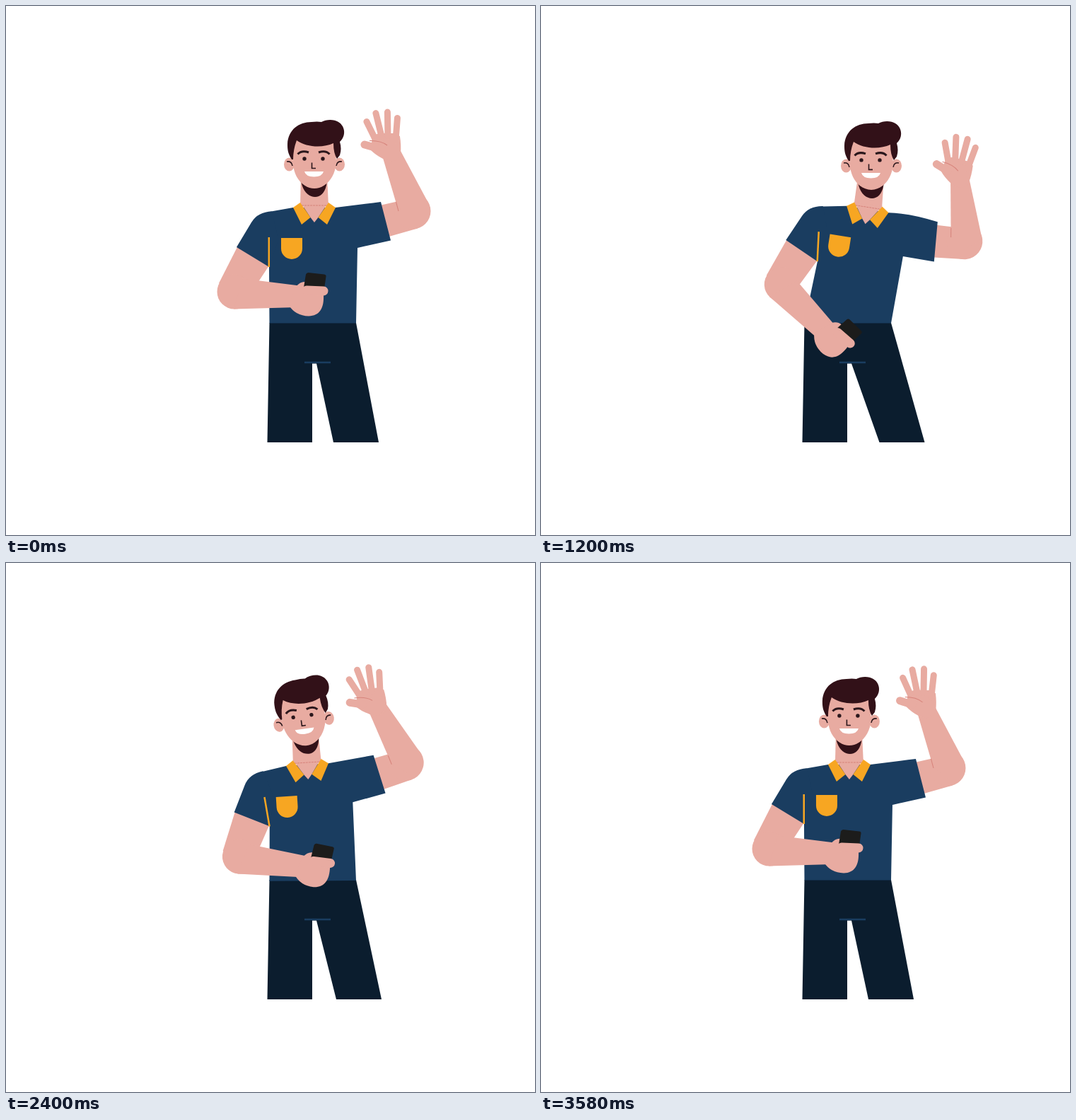
Recreate the animation shown at these times as an HTML page. Size 748x748 px, loop 3.6 s.

```html
<!DOCTYPE html>
<html lang="en">
<head>
<meta charset="utf-8">
<title>Waving man</title>
<style>
  html, body { margin: 0; width: 100%; height: 100%; overflow: hidden; background: #fff; }
  svg { display: block; width: 100%; height: 100%; }
  .skin { fill: #e8aba1; }
  .limb { fill: none; stroke: #e8aba1; stroke-linecap: round; }
  .shirt { fill: #1a3d60; }
  .navy { fill: #0b1d2e; }
  .gold { fill: #f7a622; }
  .hair { fill: #321118; }
  .ink { fill: none; stroke: #2b171c; stroke-width: 1.6; }
  .brow { fill: none; stroke: #2b171c; stroke-width: 3; }
  .crease { fill: none; stroke: #d6837b; stroke-width: 1; }
</style>
</head>
<body>
<svg viewBox="0 0 748 748">
  <g id="waveUpper"><path class="skin" d="M524 283L555 276L575 290L582 314.500L538 327Z"/></g>
  <g id="waveFore">
    <circle class="skin" cx="575" cy="290" r="25.500"/>
    <path class="skin" d="M533 215L555 290L575 305L598 280L558 205Z"/>
    <path class="crease" d="M551.500 277L555 290"/>
  </g>
  <g id="waveHand">
    <circle class="skin" cx="546" cy="207" r="12"/>
    <path class="skin" d="M518 184L527 180H549L557 184Q559 197 558 208L546 220L533 216Q523 211 516 204Z"/>
    <path class="limb" stroke-width="9" d="M510 163.500L522 188M523 151.500L531 184M539.500 150L540 184M553.500 158.500L551 190"/>
    <path class="limb" stroke-width="11" d="M507 196L525 201"/>
    <path class="crease" d="M514 190.500Q530 190 539 197"/>
  </g>

  <path id="legs" class="navy"/>
  <path d="M422 504H459" stroke="#1a3d60" stroke-width="2.500"/>
  <path id="shirt" class="shirt"/>
  <path id="neck" class="skin"/>

  <g id="chest">
    <path class="skin" d="M416 277L430.500 299L436 306L441.500 299L456 277Z"/>
    <path class="crease" stroke-dasharray="3 1" d="M418 282H453"/>
    <path id="collar" class="gold" d="M406 285L416 278L430.500 299L418 309Z"/>
    <use href="#collar" transform="translate(872 0) scale(-1 1)"/>
    <path class="gold" d="M389 328H419V343A15 15 0 0 1 389 343Z"/>
  </g>

  <g id="head">
    <path class="hair" d="M417 246C419 262 428 270 437 270S453 262 454 246Z"/>
    <g id="side">
      <ellipse class="skin" cx="400.500" cy="224" rx="7.500" ry="9.500"/>
      <path class="ink" d="M397 220Q404 219 405 226"/>
    </g>
    <use href="#side" transform="translate(872 0) scale(-1 1)"/>
    <path class="skin" d="M405 190L406.500 228C409 244 421 258 436 258S463 244 466 228L468 190Z"/>
    <path class="hair" d="M404 217C398 208 398 201 398 195C399 175 414 164 432 164Q440 163 446 164C453 160 464 160 470 164C480 170 481 184 472 192Q475 202 472 211L468 216Q463 208 463 194C448 201 425 200 411 190Q406 203 406 217Z"/>
    <g id="eye">
      <path class="brow" d="M412.500 209.500Q418 203.500 428 207"/>
      <circle cx="422" cy="216" r="2.700" fill="#2b171c"/>
    </g>
    <use href="#eye" transform="translate(870 0) scale(-1 1)"/>
    <path class="ink" d="M432.500 221.500V229.500H438"/>
    <path fill="#fff" d="M422 234H449Q447 241.500 435.500 241.500T422 234Z"/>
  </g>

  <g id="phoneUpper"><path class="skin" d="M330 335L301 392L323 412L345 408L372 367Z"/></g>
  <g id="phoneFore">
    <circle class="skin" cx="323" cy="404" r="24.500"/>
    <path class="skin" d="M335 385.500L415 395.500L412 426L322 428.500Z"/>
    <g id="phoneHand">
      <path class="skin" d="M400 423Q409 438 428 438.500C443 438 450 428 449 408L424 398V390Q416 389 410 397Z"/>
      <path fill="#1c1c1b" d="M427.500 377L450 379.500Q453 380 452.500 382.500L450 400L421 398L424 379.500Q425 377 427.500 377Z"/>
      <path class="limb" stroke-width="13" d="M425 402L449 403"/>
    </g>
  </g>
  <g id="sleeve">
    <path class="shirt" d="M376 290.500Q356 291 347 306L326 341L372 369L385 330Z"/>
    <path d="M371.800 327V369" stroke="#f7a622" stroke-width="2.500"/>
  </g>
</svg>
<script>
const LOOP = 3600, BEAT = 1200;
const el = {};
document.querySelectorAll('[id]').forEach(n => el[n.id] = n);

const hip = [433, 450], shoulder = [478, 318], elbow = [575, 291], wrist = [545, 212];
const shoulder2 = [373, 318], elbow2 = [323, 404], wrist2 = [405, 410], face = [435, 216];

function ease(t, from, to) {
  const x = Math.min(1, Math.max(0, (t - from) / (to - from)));
  return x * x * (3 - 2 * x);
}

// Rest pose, lean right, cross over to the left, then back to rest.
function sway(t, right, left, settle = 580, from = 1700, to = 2760) {
  const cross = ease(t, from, to);
  return right * (ease(t, 0, settle) - cross) + left * (cross - ease(t, 3000, LOOP));
}

// where p lands when its joint moves from rest to now and turns by deg
function turn(p, rest, now, deg) {
  const a = deg * Math.PI / 180, x = p[0] - rest[0], y = p[1] - rest[1];
  return [now[0] + x * Math.cos(a) - y * Math.sin(a), now[1] + x * Math.sin(a) + y * Math.cos(a)];
}

function place(node, rest, now, deg) {
  node.setAttribute('transform',
    `translate(${now[0] - rest[0]} ${now[1] - rest[1]}) rotate(${deg} ${rest})`);
}

function draw(time) {
  const t = time % LOOP;

  // body
  const lean = sway(t, 9, -8), headX = sway(t, 31, -33);
  const tilt = sway(t, 0, -8, 580, 1700, 2400);
  const step = sway(t, 15.5, 0, 600, 1800, 2700);

  // waving arm: one swing per beat on top of the sway, the hand trails behind
  const arm = (right, left) => sway(t, right, left, 600, 1800, 2700);
  const phase = t / BEAT * 2 * Math.PI;
  const swing = (1 - Math.cos(phase)) / 2;
  const upper = arm(19.5, -11) + swing * (17.5 + arm(0, -14.5));
  const fore = arm(16, -15) + swing * (48 + arm(0, -19));
  const lag = -18 * Math.sin(phase) - 6.6 * swing;

  // phone arm
  const upper2 = sway(t, 2.8, -10.3, 600, 1700, 2500);
  const slow = (right, left) => sway(t, right, left, 700, 1800, 2900);

  const torso = p => turn(p, hip, hip, lean);
  const s = torso(shoulder), s2 = torso(shoulder2);
  const e = turn(elbow, shoulder, s, upper);
  const w = turn(wrist, elbow, e, fore);
  const e2 = turn(elbow2, shoulder2, s2, upper2);
  const f = [face[0] + headX, face[1] + headX ** 2 / 500];
  const sleeve = p => turn(p, shoulder, s, upper);
  const head = p => turn(p, face, f, tilt);

  place(el.chest, hip, hip, lean);
  place(el.head, face, f, tilt);
  place(el.waveUpper, shoulder, s, upper);
  place(el.waveFore, elbow, e, fore);
  place(el.waveHand, wrist, w, fore + lag);
  place(el.phoneUpper, shoulder2, s2, upper2);
  place(el.sleeve, shoulder2, s2, upper2);
  place(el.phoneFore, elbow2, e2, slow(42.5, -24));
  place(el.phoneHand, wrist2, [wrist2[0] + slow(2.5, 2.5), wrist2[1]], slow(-4, 3));

  const pit = turn([497, 342], shoulder, s, lean + (upper - lean) * 0.25);
  const pit2 = turn([372, 369], shoulder2, s2, upper2);
  const drop = Math.max(0, -lean) * 0.35;
  el.shirt.setAttribute('d', `M${torso([406, 285])}L${torso([372, 291])}L${pit2}` +
    `L372.5 ${448.5 + drop}L495 ${448.5 + drop / 3}L${pit}L${sleeve([544, 331.5])}L${sleeve([530, 277])}` +
    `Q${torso([498, 281])} ${torso([466, 285])}Z`);
  el.neck.setAttribute('d',
    `M${head([417, 240])}L${torso([416, 283])}L${torso([456, 283])}L${head([454, 240])}Z`);
  el.legs.setAttribute('d',
    `M372.5 448L369.5 617H433V505.5H439L${463 + step} 617H${527 + step}L495 448Z`);
}

function tick() {
  draw(performance.now());
  requestAnimationFrame(tick);
}
tick();
</script>
</body>
</html>
```
